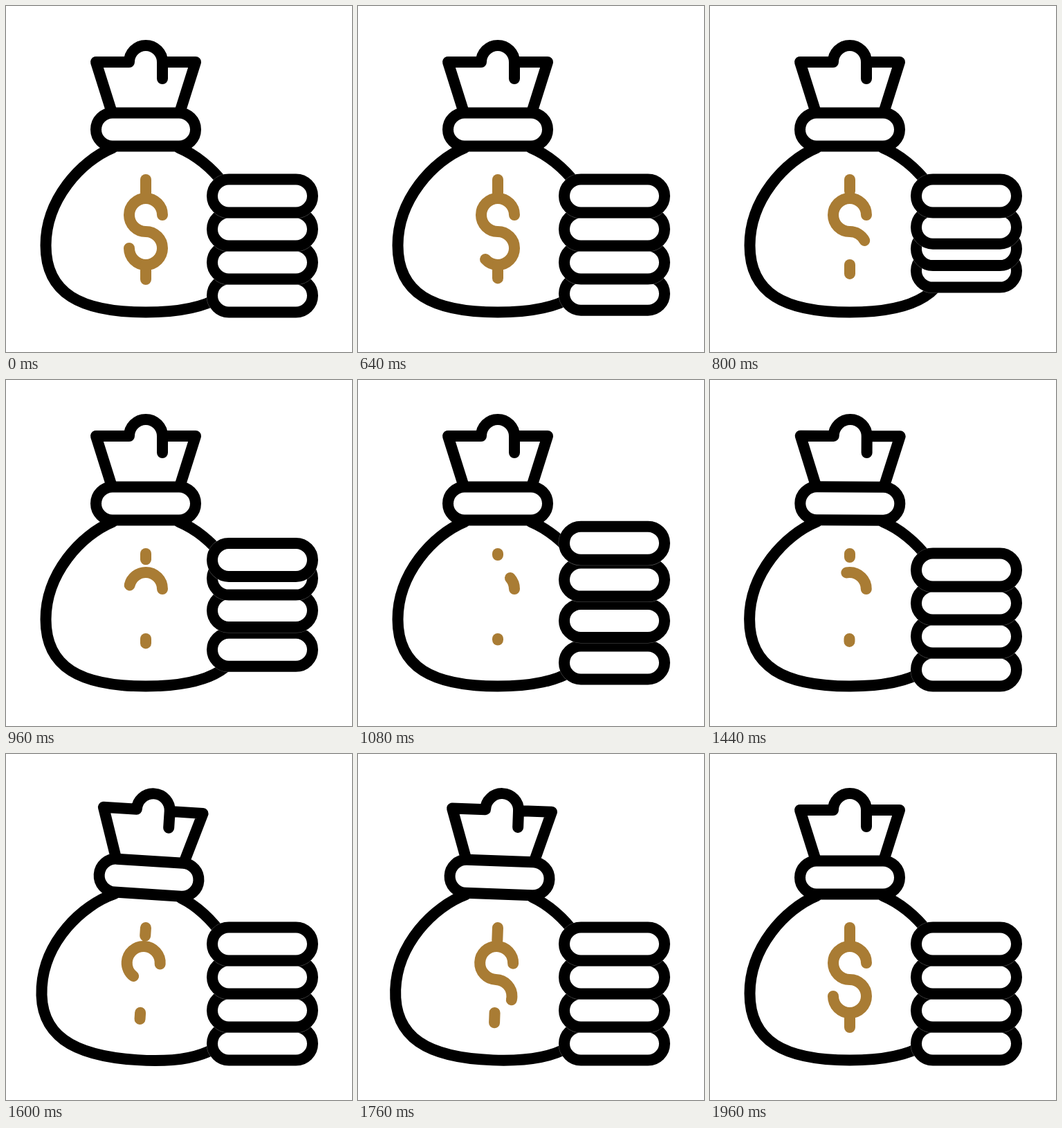
These frames come from a looping animation (500 by 500 pixels, 3000 ms). An HTML page:

```html
<!DOCTYPE html>
<html lang="en">
<head>
<meta charset="utf-8">
<title>Money bag</title>
<style>
  html, body { margin: 0; width: 100%; height: 100%; overflow: hidden; background: #fff; }
  svg { display: block; width: 100%; height: 100%; }
  .ink { fill: none; stroke: #000; stroke-width: 16; stroke-linecap: round; stroke-linejoin: round; }
  .gold { stroke: #a97c34; }
  .fill { fill: #fff; }
  .seam { fill: none; stroke: #fff; stroke-width: 17; stroke-opacity: .35; }
</style>
</head>
<body>
<svg viewBox="0 0 500 500">
  <defs>
    <g id="coin">
      <rect class="seam" x="-72.5" y="-24" width="145" height="48" rx="24"/>
      <rect class="ink fill" x="-72.5" y="-24" width="145" height="48" rx="24"/>
    </g>
  </defs>
  <g id="bag">
    <path class="ink" d="M154 205C108 224 57.5 280 57.5 346C57.5 415 107 442.5 202 442.5S346.5 415 346.5 346C346.5 280 296 224 250 205"/>
    <path class="ink" d="M153 154L130 81H178A24 24 0 0 1 226 81V105M226 81H274L251 154"/>
    <rect class="ink fill" x="130" y="154.5" width="144" height="48" rx="24"/>
    <g id="dollar">
      <path class="ink gold" pathLength="100" d="M226 302A24 24 0 1 0 202 326A24 24 0 1 1 178 350"/>
      <path class="ink gold" pathLength="100" d="M202 251V278"/>
      <path class="ink gold" pathLength="100" d="M202 374V395"/>
    </g>
  </g>
  <g id="stack"></g>
</svg>
<script>
const LOOP = 3000, STEP = 40;
const $ = id => document.getElementById(id);
const bag = $('bag'), dollar = $('dollar'), stack = $('stack');

const clamp = u => Math.max(0, Math.min(1, u));
const span = (t, a, b) => clamp((t - a) / (b - a));
const ease = u => u * u * (3 - 2 * u);

// Eased value through [time, value] keys.
function track(t, keys) {
  let value = keys[0][1];
  for (let i = 1; i < keys.length; i++) {
    const [a, from] = keys[i - 1], [b, to] = keys[i];
    if (t >= a) value = from + (to - from) * ease(span(t, a, b));
  }
  return value;
}

// Bottom coin first, so that each coin covers the one below.
const coins = [0, 1, 2, 3].map(i => {
  const el = document.createElementNS('http://www.w3.org/2000/svg', 'use');
  el.setAttribute('href', '#coin');
  stack.append(el);
  return { el, y: 418.5 - 48 * i, start: 600 + 80 * i, top: i === 3 };
});

function hop(t, { start, top }) {
  const [rise, height] = top ? [320, 46] : [240, 38.8];
  return track(t, [[start, 0], [start + rise, height], [start + 600, 0]]);
}

function draw(t) {
  for (const coin of coins) {
    const turn = coin.top ? track(t, [[1080, 0], [1430, 360]]) : 0;
    coin.el.setAttribute('transform', `translate(370.5 ${coin.y - hop(t, coin)}) rotate(${turn})`);
  }

  const tilt = track(t, [[1120, 0], [1320, -2.2], [1590, 3.65], [1960, 0]]);
  bag.setAttribute('transform', `rotate(${tilt} 202 250)`);

  const shown = t < 1200 ? 1 - span(t, 600, 1120) : span(t, 1320, 1960);
  dollar.style.display = shown > 0 ? '' : 'none';
  for (const line of dollar.children) {
    line.style.strokeDasharray = shown < 1 ? `${shown * 100} 300` : 'none';
  }
}

const begin = performance.now();
function tick() {
  const t = (performance.now() - begin) % LOOP;
  draw(Math.floor(t / STEP) * STEP);
  requestAnimationFrame(tick);
}
draw(0);
requestAnimationFrame(tick);
</script>
</body>
</html>
```
